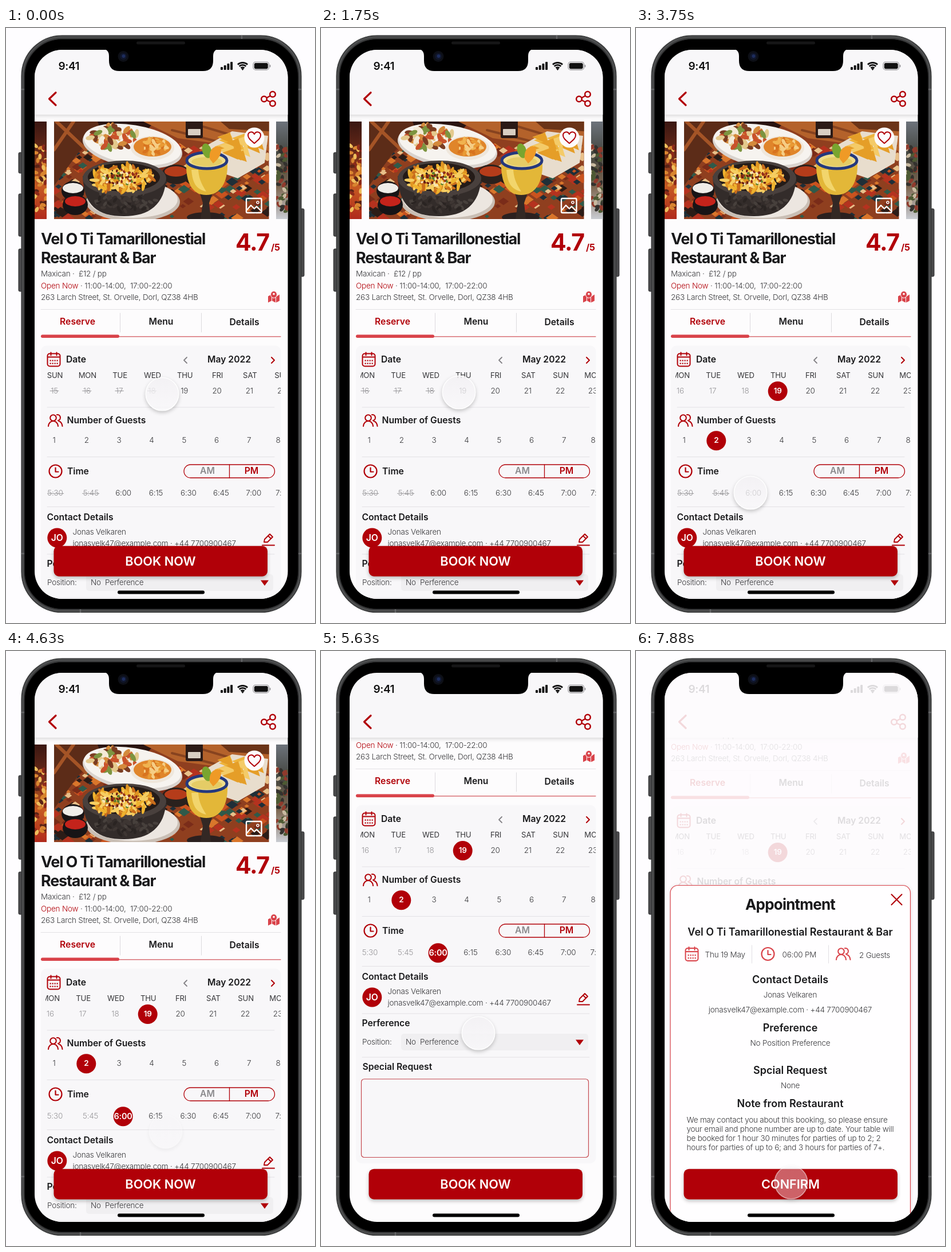
Write an HTML page with a canvas that moves like this. It is 540 by 1037 pixels and loops after 8000 ms.

```html
<!DOCTYPE html>
<html lang="en">
<head>
<meta charset="utf-8">
<title>Table booking</title>
<style>
html, body { margin: 0; width: 100%; height: 100%; overflow: hidden; background: #fefdff; }
canvas { display: block; width: 540px; height: 1037px; }
</style>
</head>
<body>
<canvas id="stage"></canvas>
<script>
const W = 540, H = 1037, LOOP = 8000;
const RED = '#b10008', SOFT_RED = '#d9434a', INK = '#19191b', GREY = '#363639', PALE = '#969598';
const VENUE = 'Vel O Ti Tamarillonestial', KIND = 'Restaurant & Bar';
const GUEST = 'Jonas Velkaren', CONTACT = 'jonasvelk47@example.com · +44 7700900467';

const canvas = document.getElementById('stage');
const c = canvas.getContext('2d');
const dpr = window.devicePixelRatio || 1;
canvas.width = W * dpr;
canvas.height = H * dpr;

const ramp = (t, a, b) => Math.min(1, Math.max(0, (t - a) / (b - a)));
const smooth = k => k * k * (3 - 2 * k);
const easeOut = k => 1 - (1 - k) ** 3;
const mix = (a, b, k) => a + (b - a) * k;

function box(x, y, w, h, r, fill, stroke, lw = 1) {
  c.beginPath();
  c.roundRect(x, y, w, h, r);
  if (fill) { c.fillStyle = fill; c.fill(); }
  if (stroke) { c.strokeStyle = stroke; c.lineWidth = lw; c.stroke(); }
}

function oval(x, y, rx, ry, fill, stroke, lw = 1, turn = 0) {
  c.beginPath();
  c.ellipse(x, y, rx, ry, turn, 0, 7);
  if (fill) { c.fillStyle = fill; c.fill(); }
  if (stroke) { c.strokeStyle = stroke; c.lineWidth = lw; c.stroke(); }
}

const disc = (x, y, r, fill, stroke, lw) => oval(x, y, r, r, fill, stroke, lw);

function line(d, color, lw = 1, x = 0, y = 0) {
  c.save();
  c.translate(x, y);
  c.strokeStyle = color;
  c.lineWidth = lw;
  c.lineCap = c.lineJoin = 'round';
  c.stroke(new Path2D(d));
  c.restore();
}

function shape(d, fill) {
  c.fillStyle = fill;
  c.fill(new Path2D(d));
}

function text(s, x, y, { size = 13.5, weight = 300, color = GREY, align = 'left', track = -0.2 } = {}) {
  c.font = `${weight} ${size}px Inter, "Liberation Sans", sans-serif`;
  c.letterSpacing = track + 'px';
  c.textAlign = align;
  c.textBaseline = 'middle';
  c.fillStyle = color;
  c.fillText(s, x, y);
}

const heading = (s, x, y, more) => text(s, x, y, { size: 15.7, weight: 600, color: INK, track: 0, ...more });
const centred = (s, x, y, more) => text(s, x, y, { align: 'center', ...more });

function fade(alpha, draw) {
  if (alpha <= 0) return;
  c.save();
  c.globalAlpha *= alpha;
  draw();
  c.restore();
}

function clipped(x, y, w, h, r, draw) {
  c.save();
  c.beginPath();
  c.roundRect(x, y, w, h, r);
  c.clip();
  draw();
  c.restore();
}

function shadowed(color, blur, dy, draw) {
  c.save();
  c.shadowColor = color;
  c.shadowBlur = blur * dpr;
  c.shadowOffsetY = dy * dpr;
  draw();
  c.restore();
}

function randomizer(seed) {
  return () => (seed = (seed * 16807) % 2147483647) / 2147483647;
}

// Icons
function calendarIcon(x, y, color) {
  box(x - 11, y - 10, 22, 22, 4, null, color, 2);
  line('M-5-12V-7M5-12V-7M-10-4H10', color, 2, x, y);
  for (let i = 0; i < 8; i++) box(x - 7 + (i % 4) * 4, y + 1 + (i >> 2) * 5, 2.2, 2.2, 0.5, color);
}

function peopleIcon(x, y, color) {
  disc(x - 3.5, y - 4.5, 5.3, null, color, 2.1);
  line('M-12 10C-11-2 4-2 5 10M3-10C10-11 11-1 5 0M6 1C10 2 12 5 12.5 10', color, 2.1, x, y);
}

function clockIcon(x, y, color) {
  disc(x, y, 11, null, color, 2.2);
  line('M0-6V1H5', color, 2.2, x, y);
}

function mapIcon(x, y) {
  shape(`M${x - 10} ${y - 1}l6-3v11l-6 3zM${x - 3} ${y - 4}l6 4v10l-6-3zM${x + 4} ${y}l6-4v11l-6 3z`, SOFT_RED);
  oval(x, y - 4, 5.5, 6, SOFT_RED, '#fdfcfd', 1);
  disc(x, y - 5, 1.8, '#fdfcfd');
}

// Food pictures
function mainPhoto() {
  const rnd = randomizer(41);
  const pick = list => list[Math.floor(rnd() * list.length)];
  const bits = (n, x, y, rx, ry, colors, len, thick) => {
    for (let i = 0; i < n; i++) {
      const a = rnd() * 6.28, d = Math.sqrt(rnd());
      oval(x + Math.cos(a) * d * rx, y + Math.sin(a) * d * ry, len, thick, pick(colors), null, 1, rnd() * 3);
    }
  };
  c.fillStyle = '#8f3f1f';
  c.fillRect(84, 163, 376, 170);
  for (let i = 0; i < 330; i++) {
    const x = 84 + rnd() * 376, y = 205 + rnd() * 130, s = 4 + rnd() * 8;
    shape(`M${x - s} ${y}l${s}-${s * 0.7} ${s} ${s * 0.7}-${s} ${s * 0.7}z`,
      pick(['#d9762b', '#2c1c17', '#b5321f', '#2f5a4a', '#e8c08a', '#7a2c19', '#1f2f38', '#c9531f']));
  }
  shape('M84 163H175L128 215 84 275z', '#5c2c18');
  shape('M160 163H260L235 190 170 190z', '#2a1410');
  line('M88 163L140 212M118 163L84 212', '#a45426', 6);
  shape('M240 163H460V214L300 192z', '#b4622b');
  shape('M375 163H460V180L390 176z', '#6b3418');
  line('M345 172L455 205M290 178L370 198', '#87431f', 4);
  box(314, 160, 30, 32, 3, '#2b1a16');
  box(318, 176, 22, 11, 1, '#d8cec2');
  oval(221, 207, 88, 36, '#d9d3ce', null, 1, 0.16);
  oval(221, 203, 86, 34, '#f6f3ef', null, 1, 0.16);
  bits(60, 188, 190, 44, 20, ['#e4c98d', '#7d9440', '#c9532b', '#f4ead6', '#7b3d22', '#d48a3c'], 8, 4);
  oval(256, 209, 38, 21, '#efe7dc');
  oval(256, 207, 33, 17, '#e0852a');
  bits(40, 256, 207, 26, 12, ['#e99a34', '#f0b350', '#d8741f', '#f5cd84'], 6, 3);
  shape('M350 205L395 180 458 188 452 235 405 262 370 250z', '#e8ddcd');
  for (let i = 0; i < 22; i++) {
    const x = 364 + rnd() * 62, y = 188 + rnd() * 34;
    shape(`M${x} ${y}l22-8 6 20z`, pick(['#eeb43c', '#e59e28', '#f4cb68']));
  }
  oval(297, 255, 25, 17, '#2a211d');
  oval(297, 250, 20, 9, '#b53c1a');
  oval(222, 303, 82, 34, '#c9beb4');
  oval(222, 299, 78, 32, '#ece6e0');
  shape('M134 258C136 310 160 328 206 328C250 328 278 308 280 260z', '#332c2a');
  bits(60, 207, 300, 55, 20, ['#3e3633', '#2a2422', '#47403c'], 5, 2.5);
  oval(207, 262, 73, 31, '#49403d');
  oval(206, 260, 63, 25, '#241b18');
  bits(130, 203, 262, 53, 22, ['#efb32f', '#e09522', '#f6ce62', '#c96d1c'], 9, 3);
  bits(65, 203, 260, 34, 14, ['#6c1d14', '#f8e5b5', '#922d1b', '#5b7d2c'], 2.6, 1.8);
  oval(117, 284, 20, 17, '#171416');
  oval(117, 279, 18, 9, '#efede9');
  oval(121, 308, 22, 18, '#171416');
  oval(121, 302, 18, 9, '#c4231b');
  oval(349, 330, 33, 9, '#2b201f');
  shape('M338 285H362L355 305 358 333H340L344 305z', '#332824');
  shape('M315 236C314 268 325 291 350 291C375 291 388 268 387 236z', '#e3b738');
  shape('M324 247C326 270 332 281 350 285C340 270 337 260 336 247z', '#f2d56c');
  oval(351, 231, 35, 14, '#efdd8c', '#24387d', 5);
  oval(351, 233, 27, 8, '#e5cc66');
  oval(351, 214, 8, 13, '#79a52f', null, 1, -0.3);
  shape('M356 228C354 212 363 204 374 207C379 215 374 226 362 236z', '#ef9a26');
}

function sidePhoto(x, w, base, colors, seed) {
  const rnd = randomizer(seed);
  clipped(x, 163, w, 170, 0, () => {
    const g = c.createLinearGradient(0, 163, 0, 333);
    base.forEach((color, i) => g.addColorStop(i / (base.length - 1), color));
    c.fillStyle = g;
    c.fillRect(x, 163, w, 170);
    for (let i = 0; i < 55; i++) {
      oval(x + rnd() * w, 205 + rnd() * 115, 5, 3, colors[Math.floor(rnd() * colors.length)], null, 1, rnd() * 3);
    }
  });
}

function gallery() {
  sidePhoto(50, 21, ['#3a1712', '#6b2a18', '#c65a22', '#b02a1c'], ['#d98530', '#8d2a1a', '#eebd5b', '#5c2316'], 7);
  clipped(84, 163, 375.5, 170, 0, mainPhoto);
  sidePhoto(472, 21, ['#6d737b', '#43453f', '#7d6650', '#c9ccd2'], ['#4d5a33', '#8f3a2c', '#c8b9a0', '#34322e'], 19);
  disc(434, 191, 17.5, '#fdfbfc');
  line('M0 10C-7 4-11 1-11-4C-11-10-3-12 0-6C3-12 11-10 11-4C11 1 7 4 0 10z', RED, 2, 434, 191);
  box(420, 297, 26.5, 25, 2, null, '#fff', 2.4);
  line('M-12 7L-5-1 1 5 5 1 12 8', '#fff', 2.2, 433, 310);
  disc(440, 304, 2, null, '#fff', 1.6);
}

// Page
function option(s, x, y, struck, strikeAlpha) {
  centred(s, x, y, { color: struck ? PALE : GREY });
  if (!struck) return;
  const half = c.measureText(s).width / 2 + 1;
  fade(strikeAlpha, () => line(`M${x - half} ${y}H${x + half}`, PALE, 1));
}

function picked(s, x, y, alpha, size = 13.5) {
  fade(alpha, () => {
    disc(x, y, 17, RED);
    centred(s, x, y, { size, weight: 600, color: '#fff' });
  });
}

const rule = y => line(`M72 ${y}H469`, '#e3e1e5', 1);

function venueInfo() {
  const title = { size: 27, weight: 700, color: INK, track: -1.2 };
  text(VENUE, 61, 369, title);
  text(KIND, 61, 401.5, title);
  text('4.7', 401, 375.5, { size: 41, weight: 700, color: RED, track: -1.4 });
  text('/5', 463, 383, { size: 16, weight: 700, color: RED });
  text('Maxican ·  £12 / pp', 61, 429);
  text('Open Now', 61, 449.5, { color: RED });
  text(' · 11:00-14:00,  17:00-22:00', 61 + c.measureText('Open Now').width, 449.5);
  text('263 Larch Street, St. Orvelle, Dorl, QZ38 4HB', 61, 469.5);
  mapIcon(468, 468.5);
  line('M61 490.5H480', '#e3e1e5');
  line('M199.5 497V530M341.5 497V530', '#dcdade');
  centred('Reserve', 125, 512, { size: 15.7, weight: 600, color: RED, track: 0 });
  heading('Menu', 271, 512, { align: 'center' });
  heading('Details', 416.5, 513, { align: 'center' });
  line('M62 537.8H480', '#d2555b', 1.2);
  box(61, 534.5, 137, 5.5, 2.7, SOFT_RED);
}

function dateSection(drag, chosen) {
  calendarIcon(83.5, 577.5, RED);
  heading('Date', 105, 578);
  line('M3-5L-2 0L3 5', '#858488', 1.8, 313, 579);
  heading('May 2022', 390, 578, { align: 'center' });
  line('M-2-5L3 0L-2 5', RED, 2, 466, 579);
  const days = ['SUN', 'MON', 'TUE', 'WED', 'THU', 'FRI', 'SAT'];
  clipped(69, 590, 411, 65, 0, () => {
    for (let i = 0; i < 9; i++) {
      const x = 85.5 + 56.8 * i - drag;
      centred(days[i % 7], x, 606, { weight: 400, size: 13.2 });
      if (i === 4) fade(1 - chosen, () => option('19', x - 1, 632.5));
      else option(String(15 + i), x - 1, 632.5, i < 4, 1 - chosen);
    }
    picked('19', 247.7, 633, chosen);
  });
  rule(661);
}

function guestSection(chosen) {
  peopleIcon(86, 684, RED);
  heading('Number of Guests', 106.5, 684.5);
  clipped(69, 695, 411, 50, 0, () => {
    for (let i = 0; i < 8; i++) {
      const x = i < 7 ? 84 + 56.8 * i : 475.5;
      fade(i === 1 ? 1 - chosen : 1, () => option(String(i + 1), x, 718.7));
    }
    picked('2', 140.3, 719.3, chosen);
  });
  rule(747.5);
}

function timeSection(chosen) {
  clockIcon(86.5, 772.5, RED);
  heading('Time', 107, 773);
  box(311, 761, 158.5, 23, 11.5, null, RED, 1.3);
  line('M390.5 761V784', RED, 1.3);
  heading('AM', 352, 772.5, { align: 'center', color: '#8b8a8d' });
  heading('PM', 429, 772.5, { align: 'center', color: RED });
  const times = ['5:30', '5:45', '6:00', '6:15', '6:30', '6:45', '7:00'];
  clipped(72, 790, 408.5, 44, 0, () => {
    times.forEach((s, i) => {
      const x = (i ? 91.3 + 56.9 * i : 86) - chosen * 0.6;
      fade(i === 2 ? 1 - chosen : 1, () => option(s, x, 811.3, i < 2, 1 - chosen));
    });
    text('7:15', 471 - chosen * 0.6, 811.3);
    picked('6:00', 204.6, 811.3, chosen, 14.5);
  });
  rule(834.5);
}

function detailSections() {
  heading('Contact Details', 71.5, 853);
  disc(89.3, 888.5, 17, RED);
  heading('JO', 89.3, 889, { align: 'center', color: '#fff' });
  text(GUEST, 116.5, 878.5);
  text(CONTACT, 116.5, 898.8);
  line('M-7 5L-6 0L3-9L8-4L-1 5zM0-6L5-1', RED, 1.9, 458, 891);
  line('M448 901.5H469', RED, 2);
  rule(917);
  heading('Perference', 71.5, 934);
  text('Position:', 72, 967);
  box(140, 952, 327, 29, 5, '#f0eff1');
  text('No  Perference', 148, 967);
  shape('M445 962.5H459L452 972z', RED);
  rule(993);
  heading('Special Request', 72.5, 1010);
  box(70.5, 1031, 397, 136.5, 5, null, '#c4474d', 1.2);
}

function header() {
  shadowed('rgba(0,0,0,0.16)', 7, 2, () => {
    c.fillStyle = '#f8f7f9';
    c.fillRect(40, 20, 462, 131);
  });
  text('9:41', 91.5, 67, { size: 19, weight: 600, color: '#111', track: -0.4 });
  for (let i = 0; i < 4; i++) box(375 + 5.7 * i, 68 - 3 * i, 4, 5 + 3 * i, 1, '#111');
  c.lineCap = 'butt';
  [4.5, 8.6, 12.6].forEach(r => {
    c.beginPath();
    c.arc(413.5, 73, r, -2.32, -0.82);
    c.strokeStyle = '#111';
    c.lineWidth = 2.7;
    c.stroke();
  });
  shape('M413.5 74L411 70.8Q413.5 69 416 70.8z', '#111');
  box(432, 59.3, 27.5, 13.6, 4, null, '#8d8c90', 1.1);
  box(433.8, 61, 24, 10.2, 2.6, '#111');
  box(460.8, 64, 1.6, 4.5, 1, '#8d8c90');
  line('M87 112.5L75.5 123.5L87 134.5', RED, 3.2);
  line('M455 122L464 117M455 125.5L464 130', RED, 2.5);
  [[451, 123.8], [466, 115.5], [466, 131.5]].forEach(([x, y]) => disc(x, y, 4.8, '#f8f7f9', RED, 2.5));
}

function bigButton(label) {
  shadowed('rgba(0,0,0,0.25)', 6, 3, () => box(83.5, 902.7, 373.5, 53, 9, RED));
  centred(label, 270, 930, { size: 21.7, weight: 600, color: '#fff', track: 0 });
}

function page(t) {
  const drag = 64 * smooth(ramp(t, 150, 900));
  const scroll = 285 * smooth(ramp(t, 4870, 5450)) - 3 * smooth(ramp(t, 5750, 6000));
  c.fillStyle = '#fdfcfd';
  c.fillRect(40, 30, 462, 975);
  c.save();
  c.translate(0, -scroll);
  gallery();
  venueInfo();
  box(61, 553.5, 419.5, 624.5, 10, '#f8f7f9');
  dateSection(drag, ramp(t, 1960, 2080));
  guestSection(ramp(t, 2730, 2850));
  timeSection(ramp(t, 3880, 4000));
  detailSections();
  c.restore();
  header();
  bigButton('BOOK NOW');
}

function appointment() {
  shadowed('rgba(0,0,0,0.14)', 7, 1, () => box(60, 408.5, 419.5, 640, 13, '#fffeff'));
  box(60, 408.5, 419.5, 640, 13, null, SOFT_RED, 1.2);
  const mid = 269.5;
  const title = (s, y) => heading(s, mid, y, { size: 18, align: 'center' });
  centred('Appointment', mid, 443, { size: 26, weight: 700, color: INK, track: -0.8 });
  line('M-9-9L9 9M9-9L-9 9', RED, 2.1, 455.5, 433.3);
  title(`${VENUE} ${KIND}`, 491);
  calendarIcon(97.5, 528, SOFT_RED);
  text('Thu 19 May', 120.5, 529.5);
  clockIcon(230.5, 528, SOFT_RED);
  text('06:00 PM', 255.5, 529.5);
  peopleIcon(362, 528, SOFT_RED);
  text('2 Guests', 390, 530.5);
  line('M202.5 513V544M336.5 513V544', '#e1dfe3');
  title('Contact Details', 574);
  centred(GUEST, mid, 600);
  centred(CONTACT, mid, 626);
  title('Preference', 658);
  centred('No Position Preference', mid, 684);
  title('Spcial Request', 732);
  centred('None', mid, 757.5);
  title('Note from Restaurant', 790);
  ['We may contact you about this booking, so please ensure',
   'your email and phone number are up to date. Your table will',
   'be booked for 1 hour 30 minutes for parties of up to 2; 2',
   'hours for parties of up to 6; and 3 hours for parties of 7+.'
  ].forEach((s, i) => text(s, 88.5, 817.5 + 16 * i));
  bigButton('CONFIRM');
}

function modal(t) {
  const k = easeOut(ramp(t, 6530, 6880));
  if (!k) return;
  fade(0.86 * k, () => {
    c.fillStyle = '#fefcfe';
    c.fillRect(40, 30, 462, 975);
  });
  c.save();
  c.translate(0, (1 - k) * 600);
  appointment();
  c.restore();
}

// Each touch: visible span, start point, optional end point with its travel span
const touches = [
  { on: -500, off: 950, from: [273, 638], to: [209, 636], move: [150, 900] },
  { on: 1350, off: 2030, from: [241, 635] },
  { on: 2250, off: 2790, from: [141, 716] },
  { on: 3130, off: 3900, from: [200, 810] },
  { on: 4580, off: 5660, from: [279, 838], to: [275, 666], move: [4850, 5420] },
  { on: 6000, off: 6450, from: [271, 927] },
  { on: 7330, off: 7760, from: [271, 926] }
];

// The shadow falls only outside the disc, so the see-through fill stays light
function touchShadow(x, y, r) {
  c.save();
  c.beginPath();
  c.rect(x - 60, y - 60, 120, 120);
  c.arc(x, y, r, 0, 7);
  c.clip('evenodd');
  shadowed('rgba(0,0,0,0.24)', 7, 3, () => disc(x, y, r, '#fff'));
  c.restore();
}

function touch(t) {
  for (const { on, off, from, to = from, move = [0, 1] } of touches) {
    const alpha = Math.min(ramp(t, on, on + 220), 1 - ramp(t, off, off + 240));
    const k = smooth(ramp(t, ...move));
    const x = mix(from[0], to[0], k), y = mix(from[1], to[1], k);
    fade(alpha, () => {
      const g = c.createLinearGradient(0, y - 29, 0, y + 29);
      g.addColorStop(0, 'rgba(242,240,243,0.8)');
      g.addColorStop(1, 'rgba(249,248,250,0.8)');
      touchShadow(x, y, 29);
      disc(x, y, 29, g);
      disc(x, y, 28.8, null, 'rgba(255,255,255,0.9)', 1.6);
    });
  }
}

// Phone
function body() {
  c.fillStyle = '#fefdff';
  c.fillRect(0, 0, W, H);
  [[22, 217, 36], [22, 289, 74], [22, 385, 74], [514, 315, 118]].forEach(([x, y, h]) =>
    box(x, y, 7, h, 2, '#4a4a4c', '#2b2b2d', 1));
  box(27, 13, 489, 1005.5, 71, '#3f4041', '#38393a', 1.2);
  box(29.5, 15.5, 484, 1000.5, 68.5, null, '#555657', 1.4);
  line('M28 107H33M510 107H515M28 916H33M510 916H515M412 14V19M130 1013V1018', '#656668', 2.5);
  box(32.5, 19.5, 478, 993, 65.5, '#000', '#1b1b1c', 1.2);
}

function notch() {
  shape('M168 36Q180 37 180 49V57Q180 75 198 75H344Q362 75 362 57V49Q362 37 374 36z', '#000');
  box(228, 23.5, 85, 5, 2.5, '#161617');
  disc(205, 49.5, 9.5, '#0d0f16');
  disc(205, 49.5, 6, '#10162b');
  disc(205.5, 49, 3, '#1d2c5c');
}

function render(t) {
  c.setTransform(dpr, 0, 0, dpr, 0, 0);
  body();
  clipped(50, 38, 442.5, 957, 48, () => {
    page(t);
    modal(t);
    box(195, 980.5, 152, 6, 3, '#000');
    touch(t);
  });
  notch();
}

const start = performance.now();
function tick(now) {
  render(Math.max(0, now - start) % LOOP);
  requestAnimationFrame(tick);
}
render(0);
requestAnimationFrame(tick);
</script>
</body>
</html>
```
